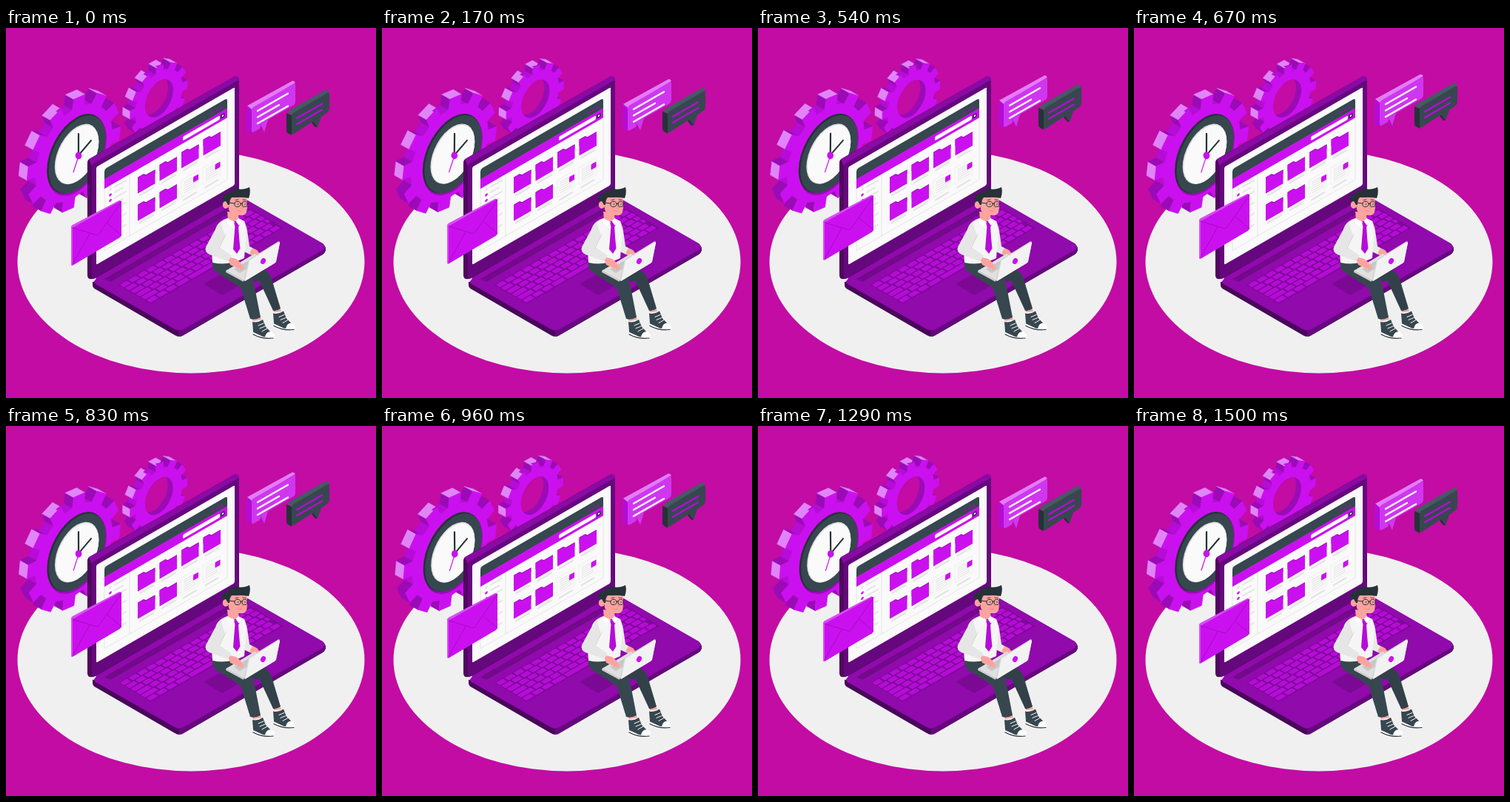
Animation of 500 by 500 pixels, one loop 1.54 s. Source, as an HTML page with a canvas:

```html
<!DOCTYPE html>
<html lang="en">
<head>
<meta charset="utf-8">
<title>Working at the laptop</title>
<style>
html, body { margin: 0; width: 100%; height: 100%; overflow: hidden; background: #c20ca3; }
canvas { display: block; width: 100vw; height: 100vh; }
</style>
</head>
<body>
<canvas id="stage" width="500" height="500"></canvas>
<script>
const ctx = document.getElementById('stage').getContext('2d');
const LOOP = 1540;
const CYCLE = 1500; // the parts rest for the remainder of the loop
const TAU = Math.PI * 2;
const SLOPE = 0.577;
const C = {
  bg: '#c20ca3', floor: '#f0f0f0', bright: '#cb10ef', light: '#e085f7', mid: '#b50cd6',
  deep: '#9a0bb6', base: '#900aac', bezel: '#66087d', dark: '#37474f', black: '#263238',
  white: '#fafafa', grey: '#e3e3e3', skin: '#fba49f', pale: '#f5f5f5'
};

function fill(color, d) {
  ctx.fillStyle = color;
  ctx.fill(new Path2D(d));
}

function line(color, width, d) {
  ctx.strokeStyle = color;
  ctx.lineWidth = width;
  ctx.lineCap = ctx.lineJoin = 'round';
  ctx.stroke(new Path2D(d));
}

function box(color, x, y, w, h, r = 0) {
  ctx.fillStyle = color;
  ctx.beginPath();
  ctx.roundRect(x, y, w, h, r);
  ctx.fill();
}

function oval(color, x, y, rx, ry = rx, turn = 0) {
  ctx.fillStyle = color;
  ctx.beginPath();
  ctx.ellipse(x, y, rx, ry, turn, 0, TAU);
  ctx.fill();
}

function group(matrix, draw) {
  ctx.save();
  ctx.transform(...matrix);
  draw();
  ctx.restore();
}

const shift = (x, y, draw) => group([1, 0, 0, 1, x, y], draw);
const wall = (x, y, draw) => group([1, -SLOPE, 0, 1, x, y], draw);

function turn(degrees, x, y, draw) {
  ctx.save();
  ctx.translate(x, y);
  ctx.rotate(degrees * Math.PI / 180);
  ctx.translate(-x, -y);
  draw();
  ctx.restore();
}

// Circle lying in the plane of the screen
function wallDisc(color, x, y, r) {
  group([0.84, -0.49, 0, 1.04, x, y], () => oval(color, 0, 0, r));
}

function polygon(color, points) {
  ctx.beginPath();
  points.forEach(([x, y]) => ctx.lineTo(x, y));
  ctx.closePath();
  ctx.fillStyle = ctx.strokeStyle = color;
  ctx.lineWidth = 0.6;
  ctx.lineJoin = 'round';
  ctx.fill();
  ctx.stroke();
}

function gear(cx, cy, radius, phase, depth) {
  const corners = [[-9, 0.82], [-7, 1], [7, 1], [9, 0.82]];
  const rim = [];
  for (let i = 0; i < 12; i++) {
    for (const [offset, k] of corners) {
      const a = (phase + i * 30 + offset) * Math.PI / 180;
      const c = Math.cos(a) * radius * k, s = Math.sin(a) * radius * k;
      rim.push([cx + c * 0.866, cy + s - c * 0.5]);
    }
  }
  const back = ([x, y]) => [x - depth, y - depth * 0.58];
  polygon(C.mid, rim.map(back));
  rim.forEach((p, i) => {
    const q = rim[(i + 1) % rim.length];
    const dx = q[0] - p[0], dy = q[1] - p[1];
    if (dx * 0.5 < dy * 0.866) return;
    const lit = (0.87 * dx - 0.5 * dy) / Math.hypot(dx, dy);
    const side = i % corners.length;
    const color = side === 1 && lit > 0.4 ? C.light : side === 3 ? C.mid : C.deep;
    polygon(color, [p, q, back(q), back(p)]);
  });
  polygon(C.bright, rim);
}

function smallGear() {
  gear(206.5, 97, 45, 2, 10);
  ctx.save();
  ctx.beginPath();
  const rim = new Path2D();
  const disc = new Path2D();
  disc.arc(0, 0, 22.5, 0, TAU);
  rim.addPath(disc, new DOMMatrix([0.84, -0.49, 0, 1.04, 207, 95]));
  ctx.clip(rim);
  wallDisc(C.deep, 207, 95, 23);
  wallDisc(C.bg, 200, 91, 22.5);
  ctx.restore();
}

function clock() {
  wallDisc(C.deep, 96, 172, 47.5);
  wallDisc(C.black, 94.5, 169.8, 46.8);
  wallDisc(C.dark, 96.3, 170.8, 45.8);
  wallDisc('#dcdcdc', 95.6, 170.4, 35.5);
  wallDisc(C.white, 96.3, 171, 34.5);
  line(C.black, 2.2, 'M98 172 V143');
  line(C.black, 2, 'M98 172 L115 152');
  line(C.bright, 1.2, 'M99 170 L91 195');
  oval(C.bright, 98, 172.5, 4.3, 5);
}

function folder(x, y) {
  fill(C.deep, `M${x} ${y} h8 l3 3 h12.5 v6 h-23.5z`);
  fill(C.bright, `M${x} ${y + 1} h8 l2.5 3 h13 v18 h-23.5z`);
  box(C.grey, x + 2, y + 25, 20, 2.5, 1);
}

function documentIcon(x) {
  line('#ececec', 0.7, `M${x} 84 h23 v23 h-23z`);
  for (let i = 0; i < 6; i++) box(C.grey, x + 3, 88 + i * 3, i < 3 ? 11 : 17, 1.1);
  box(C.bright, x + 16, 89, 7, 7.5, 1);
  box(C.grey, x + 2, 111, 19, 2.5, 1);
}

function display() {
  box(C.white, 0, 0, 187, 132, 2);
  line('#dfdfdf', 0.8, 'M11 30 V119 H177 V30 M45 35 V119');
  box(C.dark, 11, 9, 166, 14, [3, 3, 0, 0]);
  [158, 163.5, 169].forEach(x => oval(C.deep, x, 17, 1.7));
  box(C.bright, 11, 22.5, 166, 13);
  box(C.white, 117, 26.5, 50, 5.5, 2);
  box(C.black, 168.5, 26.5, 5, 5.5, 1);
  oval(C.white, 171, 29.2, 1.2);
  for (let i = 0; i < 9; i++) {
    const y = 41 + i * 7.5;
    oval(i === 1 || i === 2 ? C.bright : C.grey, 19, y, 1.8);
    box(C.grey, 24, y - 1, i % 2 ? 13 : 17, 2, 1);
  }
  for (let i = 0; i < 4; i++) folder(56 + i * 29.5, 46);
  folder(56, 83);
  folder(85.5, 83);
  documentIcon(115);
  documentIcon(144.5);
}

function keyboard() {
  group([1, -0.573, 1, 0.59, 152, 347], () => {
    box('#7d0996', 0, 0, 179, 43.5, 1);
    for (let row = 0; row < 6; row++) {
      const y = 0.8 + row * 7.1;
      if (row === 5) {
        [[1, 11], [14, 11], [27, 11], [40, 15], [57, 58], [117, 14]]
          .forEach(([x, w]) => box(C.mid, x, y, w, 5.7, 1));
        for (let x = 133; x < 175; x += 11.5) box(C.mid, x, y, 9.7, 5.7, 1);
        continue;
      }
      const lead = row * 2.2;
      box(C.mid, 1, y, 9.5 + lead, 5.7, 1);
      for (let x = 12.5 + lead; x < 174; x += 11.9) {
        box(C.mid, x, y, Math.min(10, 178 - x), 5.7, 1);
      }
    }
  });
}

function laptop() {
  fill('#4a055c', 'M117 343 L150 340 L428 292 Q432 295 432 299 Q432 303 428 306 L240 415 Q234 419 228 415 L121 353 Q117 351 117 347Z');
  fill(C.bezel, 'M234 405 L428 292 Q432 295 432 299 Q432 303 428 306 L240 415 Q237 417 234 417Z');
  fill(C.base, 'M121 340 L124 333 L311 224 L428 291 Q434 296 428 300 L240 407 Q234 410 228 407 L121 346 Q117 343 121 340Z');
  fill('#74098c', 'M133 339 L314 235 L322 239 L141 343Z');
  keyboard();
  fill('#7b0994', 'M267 346 L309 322 L334 337 L292 361Z');

  fill('#50065f', 'M110 182 Q110 178 114 176 L308 66 Q311 64 315 68 V226 L121 338 Q110 342 110 334Z');
  fill('#8a0aa5', 'M112 177.5 L308 66 Q312 64 315 68 L315 71 L121 183 Q117 184 116 187Z');
  fill(C.bezel, 'M116 187 Q116 184 120 182 L311 72 Q315 70 315 74 V226 L120 338 Q116 340 116 335Z');
  wall(122, 188, display);
}

function envelope() {
  fill('#d84ff3', 'M88 269 Q88 267 90 266 L153 233 L156 234 L154 282 L90 321 Q88 322 88 319Z');
  fill(C.bright, 'M90 270 L154 234 Q156 233 156 235 V280 Q156 281 154 283 L91 320 Q90 320 90 319Z');
  line(C.deep, 0.8, 'M90 270 L119 279 Q124 281 126 278 L156 235 M90 319 L113 278 M156 280 L137 264');
}

function pinkBubble() {
  const face = '#d036f0';
  fill(C.mid, 'M325 106 L332 109 V142 L327 139 Q325 138 325 136Z');
  fill('#e27df6', 'M326 105 L386 72 Q389 70 391 74 L332 110Z');
  fill(face, 'M332 111 Q332 109 334 107 L388 76 Q391 74 391 77 V99 Q391 102 389 104 L354 124 L349 141 L344 130 L335 140 Q332 142 332 139Z');
  fill(face, 'M332 135 L345 131 L343 136 L334 141Z');
  fill(C.mid, 'M343 136 L349 141 L347 142Z');
  line('#fff', 2.3, 'M340 112 L381 88.5 M340 120.5 L369 104 M340 129 L381 105.5');
}

function darkBubble() {
  fill(C.black, 'M379 115 L386 118 V145 L381 142 Q379 141 379 138Z');
  fill('#455a64', 'M380 113 L431 84 Q434 82 437 86 L386 118Z');
  fill(C.dark, 'M386 119 Q386 117 388 115 L434 88 Q437 86 437 89 V109 Q437 112 434 114 L426 120 L421 134 L415 126 L389 143 Q386 145 386 142Z');
  fill(C.black, 'M415 126 L421 134 L418 134 L413 128Z');
  line(C.mid, 2.3, 'M393 122 L427 102.5 M393 130 L427 110.5');
}

function shoe(x, y) {
  shift(x, y, () => {
    fill('#fff', 'M0 10 L1 20 Q13 27 25 26 Q30 25 30 21 L25 17 L14 12Z');
    fill(C.dark, 'M0 3 Q7 5 14 0 L18 10 L26 18 Q20 25 14 23 L1 17Z');
    fill('#fff', 'M17 23 Q19 16 25 16 Q31 19 29 24 Q24 26 17 23Z');
    line(C.black, 1.2, 'M1 20 Q14 27 28 25');
    line('#fff', 1, 'M8 8 L15 5 M10 12 L17 9 M13 16 L20 12');
  });
}

function man() {
  shoe(333, 394);
  shoe(361, 382.5);
  fill(C.skin, 'M331 390 L343 388 L345 394 L334 396Z M361 378 L370 377 L372 383 L362 384Z');
  fill('#324149', 'M310 322 L346 326 Q356 329 359 339 L371 379 Q366 383 361 382 L343 343 L316 338Z');
  fill(C.dark, 'M279 314 Q276 325 286 331 L314 349 Q318 352 319 357 L330 393 Q337 395 344 391 L336 350 Q334 340 326 333 L302 316Z');

  fill(C.skin, 'M299 248 L314 250 L315 263 L308 266 L300 259Z');
  fill('#e9e9e9', 'M318 262 Q325 265 326 274 L329 295 L340 301 L334 308 L319 301Z');
  fill(C.skin, 'M333 298 Q341 300 344 307 L334 309 L329 304Z');
  fill(C.pale, 'M299 257 Q290 260 286 266 L278 300 L279 317 Q300 322 322 311 L324 285 Q326 268 322 261 L314 257 L309 263Z');
  fill(C.mid, 'M308 261 L314 261 L316 266 L313 270 L309 267Z');
  fill(C.mid, 'M309.5 267 L314 267 Q315 285 316.5 298 L312 305 L307 299Z');
  fill('#fff', 'M299 257 L309 262 L304 269 L298 262Z M314 257 L318 262 L315 267 L311 262Z');

  fill('#e0e0e0', 'M297 328 L336 305 L360 318 L321 341Z');
  fill('#c7c7c7', 'M308 326 L331 312 L340 317 L316 331Z');
  fill('#cfcfcf', 'M297 328 L321 340 V343 L297 330Z');
  fill(C.skin, 'M299 309 L311 312 Q319 318 321 324 Q320 328 316 326 L303 320Z');
  fill('#e6e6e6', 'M290 262 Q285 265 283 272 L270 296 Q268 303 275 306 L300 315 L304 309 L288 298 L296 281Z');
  line('#d0d0d0', 0.8, 'M297 279 L288 297 L304 308');
  fill('#d5d5d5', 'M328 313 L367 289 Q370 287 370 290 L365 316 L323 342 L321 341Z');
  fill('#f2f2f2', 'M329 314 L368 290 Q370 289 370 291 L365 315 Q365 317 363 318 L323 342Z');
  oval(C.bright, 347.5, 315, 3.3, 4.2, 0.5);

  fill(C.skin, 'M300 229 L325 228 Q327 240 325 249 Q323 254 317 253 Q305 254 301 246Z');
  oval(C.skin, 297, 239, 4.2, 5);
  fill(C.black, 'M300 239 L297 234 Q293 235 292 231 Q292 225 298 224 L302 222 L301 218 L307 220 Q310 214 316 218 Q324 218 329 215 Q331 222 328 230 Q319 228 311 229 L305 229 Q302 232 302 239Z');
  ctx.strokeStyle = C.black;
  ctx.lineWidth = 1;
  for (const [x, r] of [[313, 4.2], [322.5, 3.6]]) {
    ctx.beginPath();
    ctx.ellipse(x, 238, r, 3.7, 0, 0, TAU);
    ctx.stroke();
    oval(C.black, x + 0.5, 238, 0.7, 1);
  }
  line(C.black, 1, 'M300 236 L309 237 M317 237 H319');
  line(C.black, 0.8, 'M310 232.5 L314 231.8 M320 232 L324 232.4');
  line('#e58480', 0.8, 'M318 240 L319.5 243 L317.5 243.5 M313 247 Q316 248.5 319 247');
}

// Triangle wave: 0 at the start of the cycle, 1 half way through
const tri = p => 1 - Math.abs(1 - 2 * (p - Math.floor(p)));

function render(t) {
  const p = Math.min(t % LOOP / CYCLE, 1);
  const lift = -10 * tri(p);
  const sway = 2 * tri(p + 0.25) - 1;

  ctx.fillStyle = C.bg;
  ctx.fillRect(0, 0, 500, 500);
  oval(C.floor, 250, 316, 234.5, 150.5);

  turn(sway, 132, 147, () => {
    smallGear();
    gear(91.5, 169.5, 73, 7, 11);
    clock();
  });
  laptop();
  man();
  shift(0, lift, () => {
    envelope();
    pinkBubble();
    darkBubble();
  });
}

const start = performance.now();
function tick(now) {
  render(Math.max(0, now - start));
  requestAnimationFrame(tick);
}
render(0);
requestAnimationFrame(tick);
</script>
</body>
</html>
```
